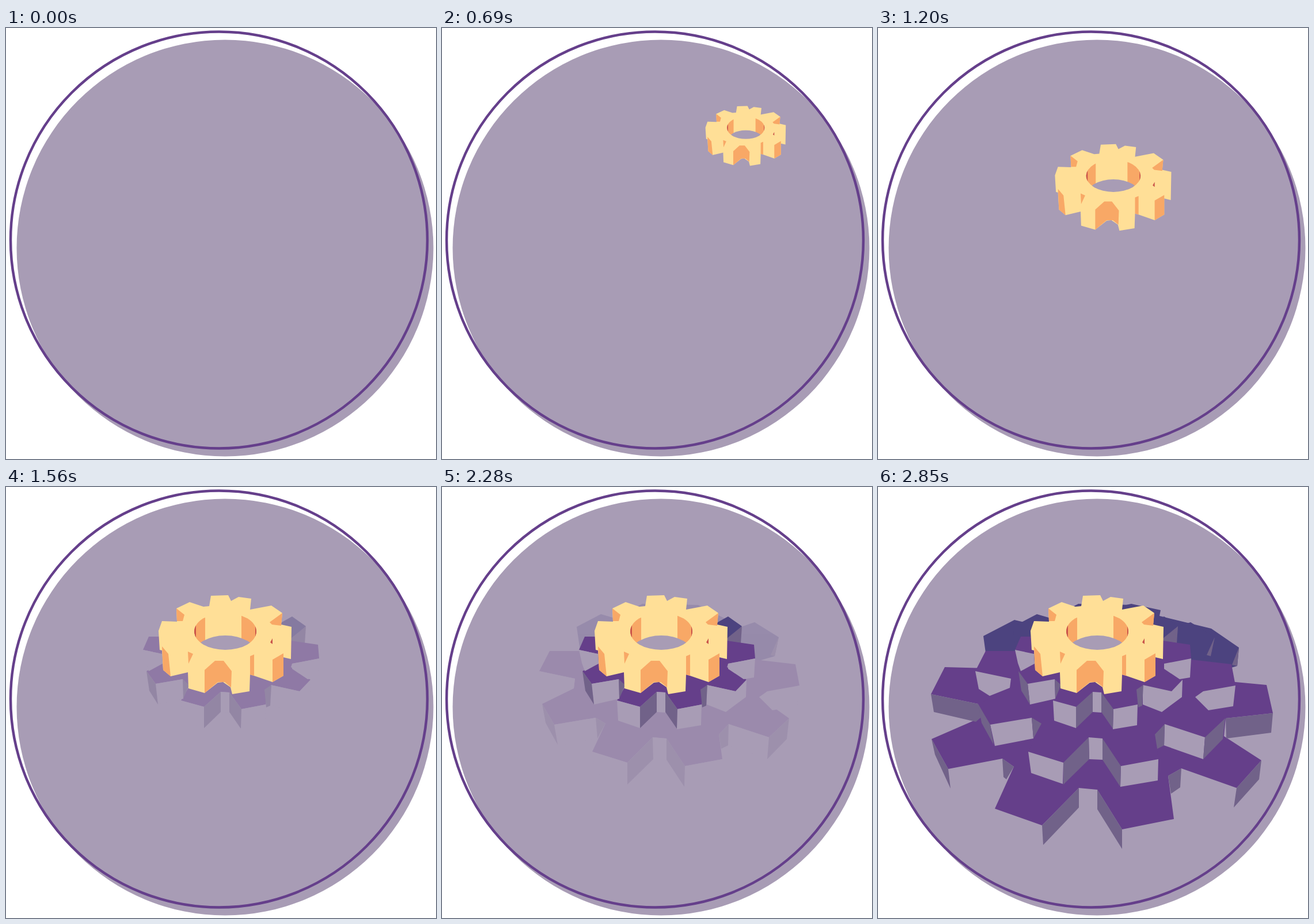
Animation of 747 by 749 pixels, one loop 3.09 s. Source, as an HTML page:

```html
<!DOCTYPE html>
<html lang="en">
<head>
<meta charset="utf-8">
<title>Stacked gears</title>
<style>
html, body { margin: 0; width: 100%; height: 100%; overflow: hidden; background: #fff; }
svg { display: block; width: 747px; height: 749px; }
.base { fill: #a89cb5; }
.ring { fill: none; stroke: #653f8b; stroke-width: 4.5; }
.top { fill: #653f8a; }
.back { fill: #4c437f; }
.side { fill: #716289; }
.light { fill: #ffdf97; }
.shade { fill: #f8a866; }
.deep { fill: #c9534a; }
</style>
</head>
<body>
<svg viewBox="0 0 747 749">
  <defs>
    <clipPath id="bore"><ellipse cx="381" cy="251" rx="54" ry="32"/></clipPath>
  </defs>
  <circle class="base" cx="380.5" cy="382.5" r="362"/>

  <g id="large" opacity="0">
    <path class="back" d="M183 259L237 231 275 240 440 203 491 214 489 224 579 246 627 279 624 311 560 330 240 300 187 288Z"/>
    <path class="side" d="M627 279L624 311 615 309Z"/>
    <path class="top" d="M116 313L190 315 300 280 480 280 600 337 675 344 686 393 604 402 601 433 666 475 623 523 527 489 504 502 514 577 424 595 381 526 349 523 285 588 203 559 236 486 216 472 122 490 93 438 178 401 174 377 92 360Z"/>
    <path class="side" d="M92 360L174 377 179 400 170 408 97 391ZM93 438L122 490 126 524 99 465ZM216 472L236 486 223 508 218 504ZM285 588L349 523V557L287 622ZM381 526L424 595V629L381 560ZM504 502L527 489 525 522 509 533ZM623 523L666 475 662 508 618 557ZM604 402L686 393 683 427 605 437Z"/>
  </g>

  <g id="middle" opacity="0">
    <path class="back" d="M234 243L276 221 300 228 348 203 445 205 520 243 543 235 585 261 578 294 540 305 300 290 240 285Z"/>
    <path class="side" d="M585 261L578 294 571 292Z"/>
    <path class="top" d="M187 285L240 285 262 260 500 260 545 300 614 308 621 345 551 365 603 402 568 435 498 412 481 430 487 473 422 485 390 437 366 435 322 479 261 460 284 411 267 401 195 413 174 377 229 350 231 333 169 320Z"/>
    <path class="base" d="M169 320L231 333 229 349 194 363 175 351ZM195 413L267 401 270 437 203 450ZM261 460L322 479 321 516 266 497ZM366 435L390 437V474L367 473ZM422 485L487 473 486 510 421 521ZM498 412L568 435 565 473 497 449ZM621 345L617 381 574 388 551 365 565 355Z"/>
    <path class="side" d="M174 377L195 413 201 448 180 410ZM267 401L284 411 270 437ZM322 479L366 435 367 473 322 517ZM390 437L422 485 421 521 390 474ZM481 430L498 412 497 449 485 455ZM568 435L603 402 599 438 565 473Z"/>
  </g>

  <g id="small" opacity="0">
    <path class="back" d="M470 240L497 225 521 242 497 265Z"/>
    <path class="side" d="M521 242L519 273 495 270V263Z"/>
    <path class="top" d="M248 260H300L460 262 542 274 544 298 497 307 495 313 529 335 510 355 460 344 451 378 409 386 388 357 373 356 344 382 304 371 318 347 307 334 260 342 244 320 272 306 271 290 238 283Z"/>
    <path class="base" d="M238 283L271 290 272 307 248 320 243 306ZM260 342L307 334 308 368 264 378ZM304 371L344 382V419L306 406ZM373 356L388 357V392L373 391ZM409 386L451 378 450 414 408 421ZM460 344L510 355 529 335 528 365 493 391 460 378ZM544 298L542 331 524 334 497 316V307Z"/>
    <path class="side" d="M244 320L260 342 264 378 249 354ZM307 334L318 344 308 368ZM344 382L373 356V391L344 419ZM388 357L409 386 408 420 388 391ZM449 352L461 344 459 380 452 383Z"/>
  </g>

  <g id="gold" opacity="0">
    <path class="light" d="M356 189L386 188 391 198 404 191 426 194 424 213 461 206 480 219 478 239 496 243 495 299 482 296V328L463 339 431 328 424 326 423 355 393 360 390 348 377 339 368 340 345 358 317 350 316 322 286 329 273 318 271 284 267 283 265 250 271 233 297 234 296 211 319 200 343 208 353 207Z"/>
    <path class="shade" d="M296 211L310 222 307 233 297 233ZM480 219L478 241 462 239 458 235ZM271 277L282 290 286 329 273 318ZM316 286L325 290 317 307ZM345 318L363 302H378L392 320 391 348 380 339H368L345 358ZM482 289L463 300V339L482 328ZM424 294L431 291V328L424 326Z"/>
    <path class="deep" d="M463 263V273L459 270Z"/>
    <g clip-path="url(#bore)">
      <path class="shade" d="M326 215H346V285H326ZM409 215H436V285H409Z"/>
      <path class="deep" d="M326 236H330V268H326ZM433 236H436V268H433Z"/>
      <ellipse class="base" cx="381" cy="290" rx="54" ry="32"/>
    </g>
  </g>

  <circle class="ring" cx="370" cy="368.5" r="362"/>
</svg>
<script>
const LOOP = 3090, STEP = 30, START = 150;
const HOME = [380, 274];

// time, centre x, centre y, scale
const flight = [
  [150, 197, 63, 0.05],
  [420, 401, 144, 0.414],
  [675, 522, 184, 0.595],
  [790, 538, 219, 0.655],
  [930, 497, 260, 0.72],
  [1200, 408, 277, 0.875],
  [1410, 380, 274, 1]
];

// time, opacity
const fades = {
  small: [[1410, 0], [1560, 0.37], [1980, 1]],
  middle: [[1980, 0], [2280, 0.19], [2460, 1]],
  large: [[2290, 0], [2580, 0.76], [2850, 1]]
};

const byId = id => document.getElementById(id);

function segment(keys, t) {
  let i = 0;
  while (i < keys.length - 2 && t >= keys[i + 1][0]) i++;
  const span = keys[i + 1][0] - keys[i][0];
  const u = Math.min(1, Math.max(0, (t - keys[i][0]) / span));
  return { i, u, span };
}

function linear(keys, t) {
  const { i, u } = segment(keys, t);
  return keys[i][1] + (keys[i + 1][1] - keys[i][1]) * u;
}

// Cubic Hermite curve with slopes taken from the neighbouring keys
function smooth(keys, t, column) {
  const { i, u, span } = segment(keys, t);
  const slope = k => {
    const a = keys[Math.max(0, k - 1)], b = keys[Math.min(keys.length - 1, k + 1)];
    return (b[column] - a[column]) / (b[0] - a[0]) * span;
  };
  const p = keys[i][column], q = keys[i + 1][column], v = 1 - u;
  return p * v * v * (1 + 2 * u) + q * u * u * (3 - 2 * u)
    + slope(i) * u * v * v - slope(i + 1) * u * u * v;
}

function draw(now) {
  const t = Math.floor((now % LOOP) / STEP) * STEP;
  const [x, y, scale] = [1, 2, 3].map(column => smooth(flight, t, column));
  const gold = byId("gold");
  gold.setAttribute("opacity", t < START ? 0 : 1);
  gold.setAttribute("transform",
    `translate(${x} ${y}) scale(${scale}) translate(${-HOME[0]} ${-HOME[1]})`);
  for (const id in fades) byId(id).setAttribute("opacity", linear(fades[id], t));
}

const begin = performance.now();
function tick() {
  draw(performance.now() - begin);
  requestAnimationFrame(tick);
}
tick();
</script>
</body>
</html>
```
